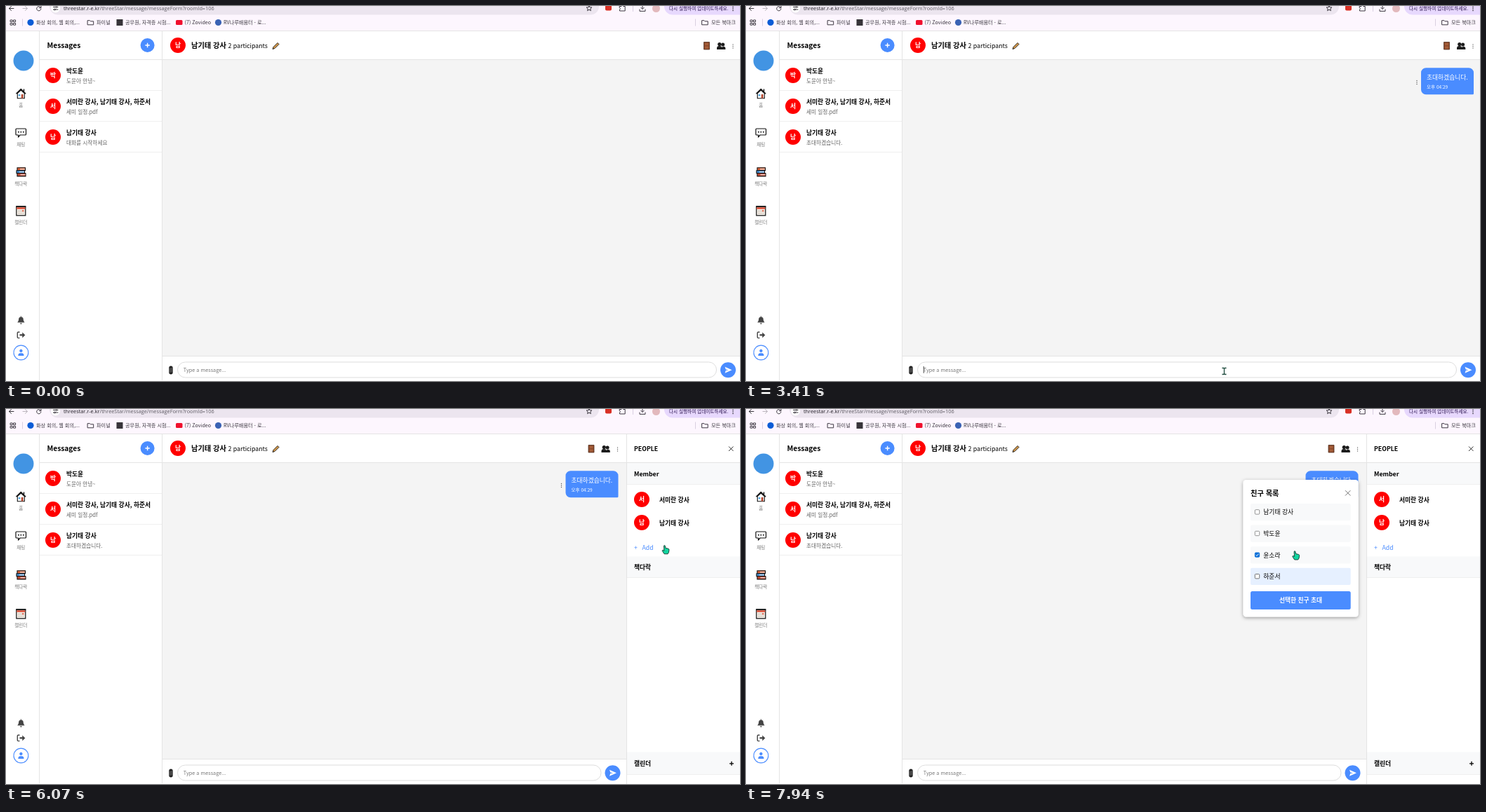
Animation, 1046 px wide and 535 px high, one loop 8000 ms. Source, as an HTML page:

```html
<!DOCTYPE html>
<html lang="ko">
<head>
<meta charset="utf-8">
<title>Messages</title>
<style>
html, body { margin: 0; width: 100%; height: 100%; overflow: hidden; background: #fff; }
svg { display: block; width: 1046px; height: 535px; }
text { font: 8.75px "Noto Sans CJK KR", "Noto Sans CJK", "Noto Sans KR", sans-serif; white-space: pre; fill: #000; }
.b { font-weight: 700; }
.h { font-size: 10.24px; font-weight: 700; }
.sub { font-size: 7.66px; fill: #666; }
.nav { font-size: 6.56px; fill: #777; text-anchor: middle; }
.in { font-size: 7.3px; }
.time { font-size: 6.56px; }
.bar { font-size: 7.15px; fill: #3c3840; }
.update { font-size: 6.6px; font-weight: 500; fill: #2d1650; }
.url { font: 7.34px "Open Sans", "Noto Sans", sans-serif; fill: #5c5861; }
.w { fill: #fff; }
.mid { text-anchor: middle; }
.blue { fill: #4a8cff; }
.grey { fill: #777; }
.line { fill: none; stroke: #3c3840; stroke-width: 1; stroke-linecap: round; stroke-linejoin: round; }
.rule { stroke: #e4e4e4; fill: none; }
.soft { stroke: #efefef; fill: none; }
.ink { fill: none; stroke: #111; stroke-linejoin: round; }
</style>
</head>
<body>
<svg viewBox="0 0 1046 535">
  <defs>
    <filter id="shadow" x="-10%" y="-10%" width="120%" height="120%">
      <feDropShadow dx="0" dy="1.5" stdDeviation="2.5" flood-opacity=".38"/>
    </filter>
    <path id="folder" class="line" d="M.5 1.2h3l1 1.1h4.2v5H.5z"/>
    <g id="dots"><circle r=".7" cy="-2.5"/><circle r=".7"/><circle r=".7" cy="2.5"/></g>
  </defs>

  <!-- browser bars -->
  <rect width="1046" height="35" fill="#fdf6fe"/>
  <rect x="62" y="-12" width="783" height="24.5" rx="12" fill="#ece5ef"/>
  <rect x="938" y="-12" width="120" height="24.5" rx="12" fill="#e7d8fd"/>
  <g class="line">
    <path d="M11 3.5H4.5M7.5 .5l-3 3 3 3"/>
    <path stroke="#bbb4bd" d="M24 3.5h6.500M27.5 .5l3 3-3 3"/>
    <path d="M49.7 2.6a3.1 3.1 0 1 0 .2 1.6M50 .3v2.4h-2.4"/>
  </g>
  <circle cx="70.5" cy="3" r="6.5" fill="#fff"/>
  <path class="line" d="M67.5 1.5h3M73 1.5h1M67.5 5h1M71 5h3"/>
  <circle class="line" cx="71.7" cy="1.5" r="1"/><circle class="line" cx="69.5" cy="5" r="1"/>
  <text class="url" x="82" y="6"><tspan fill="#1f1b24">threestar.r-e.kr</tspan>/threeStar/message/messageForm?roomId=106</text>
  <path class="line" d="M831 -.8l1.1 2.6 2.8.2-2.1 1.9.6 2.8-2.4-1.5-2.4 1.5.6-2.8-2.1-1.9 2.8-.2z"/>
  <rect x="854" y="-1" width="9" height="7.5" rx="2" fill="#d93025"/>
  <path class="line" d="M874.5 .5h2.5a1.4 1.4 0 0 1 2.8 0h2.4v6.5h-7.7v-2a1.4 1.4 0 0 0 0-2.6z"/>
  <path d="M893.5 0v8" stroke="#d9cfe0"/>
  <path class="line" d="M907 -1v5M904.7 2.2l2.3 2.3 2.3-2.3M903 5v2.4h8V5"/>
  <circle cx="926.5" cy="3.5" r="5.5" fill="#e3b9bd"/>
  <text class="bar update" x="945" y="6">다시 실행하여 업데이트하세요.</text>
  <use href="#dots" x="1036" y="4"/>

  <path class="line" d="M6.5 20h2.6v2.6H6.5zM11 20h2.6v2.6H11zM6.5 24.5h2.6v2.6H6.5zM11 24.5h2.6v2.6H11z"/>
  <path d="M23.5 18.5v10M982.5 18.5v10" stroke="#d9cfe0"/>
  <circle cx="35" cy="23.5" r="4.6" fill="#0b5cd6"/>
  <text class="bar" x="43" y="26">화상 회의, 웹 회의,...</text>
  <use href="#folder" x="116" y="19.5"/>
  <text class="bar" x="129" y="26">파이널</text>
  <rect x="157.5" y="19" width="9" height="9" fill="#38343a"/>
  <text class="bar" x="170" y="26">공무원, 자격증 시험...</text>
  <rect x="242" y="20" width="9.5" height="7" rx="1.5" fill="#f00f2d"/>
  <text class="bar" x="254.5" y="26">(7) Zovideo</text>
  <circle cx="302.5" cy="23.5" r="4.6" fill="#3a62b4"/>
  <text class="bar" x="310" y="26">RV나루배움터 - 로...</text>
  <use href="#folder" x="991.5" y="19.5"/>
  <text class="bar" x="1005" y="26">모든 북마크</text>

  <!-- page -->
  <rect x="223" y="77" width="823" height="422" fill="#f4f4f4"/>
  <path class="rule" d="M0 35.5h1046M47.5 36v498M222.5 36v498M48 76.5h998M223 499.5h823"/>
  <path class="soft" d="M48 120.5h174M48 164.5h174M48 208.5h174"/>

  <!-- side rail -->
  <circle cx="25" cy="78" r="14.5" fill="#4294e3"/>
  <path d="M16.3 124.5v7.2h10v-7.2l-5-4.500z" fill="#fff" stroke="#111" stroke-width="1.1"/>
  <path d="M14.5 125.3l6.8-6.8 6.8 6.8" class="ink" stroke-width="1.5"/>
  <path d="M25.5 118.500v3.500" class="ink" stroke-width="1.4"/>
  <path d="M17.800 126h2.500v2.500h-2.500z" fill="#4aa3e0"/><path d="M21.800 126h2.700v5.500h-2.700z" fill="#b5472f"/>
  <text class="nav" x="21.3" y="143.5">홈</text>
  <path class="ink" stroke-width="1.2" d="M15 175h12.5q1 0 1 1v7q0 1-1 1H20l-2.5 3v-3H15q-1 0-1-1v-7q0-1 1-1z"/>
  <path d="M17 179h1.7v1.5H17zM20.5 179h1.7v1.5h-1.7zM24 179h1.7v1.5H24z"/>
  <text class="nav" x="21.3" y="199.5">채팅</text>
  <g stroke="#111" stroke-width="1.1">
    <path d="M16 230.7h11.5v4H16z" fill="#d9633b"/><path d="M15 234.7h11.5v4H15z" fill="#458fd0"/><path d="M16 238.7h12v4.2H16z" fill="#c94c34"/>
    <path d="M20 232.7h7M19 236.7h7M20.5 240.8h7" stroke="#fff"/>
  </g>
  <text class="nav" x="21.3" y="255.5">책다락</text>
  <path d="M14.8 286h13v12.8h-13z" fill="#f3eee7" stroke="#111" stroke-width="1.2"/>
  <path d="M15.3 287.3h12v2.5h-12z" fill="#d94b35"/><path d="M14.3 286.1h14" class="ink" stroke-width="1.7"/>
  <path d="M17 292.5h8.5M17 295.5h8.5" stroke="#b8a99b" stroke-dasharray="1.5 .8"/><path d="M23 291.3h2.5v2H23z" fill="#e0614a"/>
  <text class="nav" x="21.3" y="311">캘린더</text>
  <path d="M16.3 451.5q1.8-1.8 1.8-4.5a3.3 3.3 0 0 1 6.6 0q0 2.7 1.8 4.5zM20 452.5h2.8a1.4 1.4 0 0 1-2.8 0zM20.8 442.6H22v2h-1.2z" fill="#444"/>
  <path d="M19.5 465.3h-2.2q-1 0-1 1v6.3q0 1 1 1h2.2" fill="none" stroke="#444" stroke-width="1.4"/>
  <path d="M19.5 468.2h3.8v-2.8l4 4-4 4v-2.8h-3.8z" fill="#444"/>
  <circle cx="21.4" cy="494.5" r="10.4" fill="#fff" stroke="#4a8cff" stroke-width="1.1"/>
  <path class="blue" d="M21.4 489.8a2.2 2.2 0 1 1-.01 0zM17.3 499q0-3.7 3-3.7h2.2q3 0 3 3.7z"/>

  <!-- conversation list -->
  <text class="h" x="58.5" y="60">Messages</text>
  <circle class="blue" cx="201.6" cy="56" r="10"/>
  <path d="M198.4 56h6.4M201.6 52.8v6.4" stroke="#fff" stroke-width="1.4"/>
  <g id="list"></g>
  <text class="sub" x="86" y="110">도윤아 안녕~</text>
  <text class="sub" x="86" y="154">세미 일정.pdf</text>
  <text class="sub" x="86" y="197.5" id="last"></text>

  <!-- chat -->
  <g id="head"></g>
  <text class="h" x="264" y="60.3">남기태 강사</text>
  <text x="316.5" y="59.7">2 participants</text>
  <path d="M380 61.5l1-3 6-6 2 2-6 6z" fill="#d79a4c" stroke="#111" stroke-width=".9" stroke-linejoin="round"/>
  <g id="right">
    <path d="M994.5 51.5h8v10.5h-8z" fill="#8c4a2c" stroke="#54301f" stroke-width=".8"/>
    <path d="M996.2 53h4.6v3h-4.6zM996.2 57.5h4.6v3.2h-4.6z" fill="#a55d38"/>
    <g fill="#1c1c1c">
      <circle cx="1016.8" cy="54.5" r="2.6"/><circle cx="1021.6" cy="55" r="2.5"/>
      <path d="M1013 62v-2q0-3 3.5-3t3.5 2q1-1.200 2.500-1.200 2.800 0 2.800 2.800v1.400z"/>
    </g>
    <use href="#dots" x="1036" y="57.5" fill="#666"/>
    <g id="bubble">
      <path class="blue" d="M969 88.3h61a7 7 0 0 1 7 7v29.5q0 1.5-1.5 1.5H969a7 7 0 0 1-7-7v-24a7 7 0 0 1 7-7z"/>
      <text class="w" x="970" y="105">초대하겠습니다.</text>
      <text class="w time" x="970" y="118">오후 04:29</text>
      <use href="#dots" x="956" y="109" fill="#555"/>
    </g>
    <circle class="blue" cx="1029" cy="519.2" r="11"/>
    <path class="w" d="M1024.5 514.700l10 4.500-10 4.500 1.300-3.700 4-.8-4-.8z"/>
  </g>
  <rect x="232.3" y="513.5" width="5.4" height="12" rx="2.7" fill="#222"/>
  <path d="M234 516.5v6.5M236 516v6.5" stroke="#8a8a8a" stroke-width=".7"/>
  <rect id="field" x="244.5" y="508" width="768" height="22" rx="11" fill="#fff" stroke="#ddd"/>
  <text class="in grey" x="252.8" y="521.8" id="hint">Type a message...</text>
  <text class="in" x="252.8" y="521.8" id="typed"></text>
  <rect id="mark" y="523" width="6.7" height=".7"/>
  <rect id="caret" y="514" width=".7" height="9.8"/>

  <!-- people panel -->
  <g id="panel">
    <rect x="884" y="36" width="162" height="499" fill="#fff"/>
    <path fill="#f8f9fa" d="M884 77h162v31H884zM884 210.5h162v30H884zM884 489.5h162v32H884z"/>
    <path class="rule" d="M884.5 36v499M884 76.5h162"/>
    <path class="soft" d="M885 107.5h161M885 240.5h161M885 521.5h161"/>
    <text class="b" x="895" y="59.7">PEOPLE</text>
    <path d="M1030 53.5l6.5 6.5M1036.5 53.5L1030 60" stroke="#222" stroke-width=".9"/>
    <text class="b" x="895" y="95.5">Member</text>
    <g id="members"></g>
    <text class="blue" x="895" y="201.3">+</text>
    <text class="blue" x="906.5" y="201.3">Add</text>
    <text class="b" x="895" y="229">책다락</text>
    <text class="b" x="895" y="509">캘린더</text>
    <path d="M1031 505.8h6M1034 502.8v6" stroke="#000" stroke-width="1.3"/>
  </g>

  <!-- friend picker -->
  <g id="picker">
    <rect x="708.5" y="101" width="164.3" height="195.5" rx="4.5" fill="#fff" filter="url(#shadow)"/>
    <text class="h" x="719" y="123.5">친구 목록</text>
    <path d="M854 116.2l7.4 7.4M861.4 116.2l-7.4 7.4" stroke="#666" stroke-width=".9"/>
    <g id="rows"></g>
    <rect class="blue" x="719" y="260" width="142.7" height="26" rx="2.5"/>
    <text class="b w mid" x="790.5" y="276.3">선택한 친구 초대</text>
  </g>

  <!-- pointer shapes, origin at the hot spot -->
  <g id="pointer" stroke-linejoin="round">
    <path id="beam" d="M-3-4.5h2.2l.8.7.8-.7H3M0-4v8M-3 4.5h2.2L0 3.8l.8.7H3" fill="none" stroke="#1d4a3c" stroke-width="1.3"/>
    <path id="arrow" d="M0 0v10.2l2.3-2 1.7 3.6 1.6-.8-1.7-3.4h3z" fill="#1fd6a4" stroke="#17332b" stroke-width=".9"/>
    <path id="hand" d="M-.9.8Q-.2-.5.9.8L1.5 4l4 1q1.4.5 1.1 2L6 10.5 4.7 12.5H-.3L-3.2 8q.2-1.6 1.7-.8l1 .8z" fill="#12d6a0" stroke="#17332b" stroke-width=".9"/>
  </g>
</svg>
<script>
const $ = id => document.getElementById(id);
const show = (id, on) => $(id).setAttribute('visibility', on ? 'inherit' : 'hidden');

const avatar = (x, y, c) =>
  `<circle cx="${x}" cy="${y}" r="11" fill="#f00"/><text class="b w mid" x="${x}" y="${y + 3.2}">${c}</text>`;
const label = (x, y, s) => `<text class="b" x="${x}" y="${y}">${s}</text>`;

const chats = ['박도윤', '서미란 강사, 남기태 강사, 하준서', '남기태 강사'];
$('list').innerHTML = chats.map((s, i) => avatar(67, 99 + 44 * i, s[0]) + label(86, 95.5 + 44 * i, s)).join('');
$('head').innerHTML = avatar(245, 56, '남');
$('members').innerHTML = ['서미란 강사', '남기태 강사']
  .map((s, i) => avatar(906, 129 + 33 * i, s[0]) + label(931, 132.5 + 33 * i, s)).join('');

const rowTop = i => 135 + 30.6 * i;
$('rows').innerHTML = ['남기태 강사', '박도윤', '윤소라', '하준서'].map((s, i) => {
  const y = rowTop(i);
  return `<rect class="row" x="719" y="${y}" width="142.7" height="24.2" rx="2"/>
    <rect class="box" x="725.3" y="${y + 8.7}" width="6.4" height="6.4" rx="1.2" stroke-width=".8"/>
    <text x="737.3" y="${y + 15.3}">${s}</text>`;
}).join('') + '<path id="tick" d="M726.7 208.3l1.3 1.3 2.5-3" fill="none" stroke="#fff"/>';
const rows = document.querySelectorAll('.row'), boxes = document.querySelectorAll('.box');

const ENTER = 460, FOCUS = 760, SEND = 3410, BLUR = 5400, OPEN = 5640, PICK = 6520, CHECK = 7380;
const keys = [
  [1220, 'ㅊ'], [1410, '초'], [1610, '촏'], [1700, '초대'], [1800, '초댛'], [1890, '초대하'],
  [1980, '초대학'], [2070, '초대하게'], [2350, '초대하겠'], [2480, '초대하겠ㅅ'], [2630, '초대하겠스'],
  [2810, '초대하겠습'], [2890, '초대하겠습ㄴ'], [2970, '초대하겠습니'], [3050, '초대하겠습닏'],
  [3130, '초대하겠습니다'], [3210, '초대하겠습니다.'], [SEND, '']
];
const path = [
  [460, 688, 531], [800, 681.5, 521], [3850, 681.5, 521], [4180, 880, 290], [4520, 1036, 47],
  [5030, 1034, 53], [5300, 1034.5, 55], [5680, 1034.5, 55], [5960, 955, 192], [6060, 938.5, 194.3],
  [6350, 910, 194], [6800, 907, 194], [7060, 808.3, 195.3], [7300, 785, 202], [7430, 785, 202],
  [7600, 786, 230], [7750, 793, 235.5], [7850, 792, 235], [7935, 782, 202.5]
];

function pointerAt(t) {
  const i = path.findIndex(p => p[0] > t);
  if (i < 0) return path[path.length - 1].slice(1);
  if (i === 0) return path[0].slice(1);
  const [t0, x0, y0] = path[i - 1], [t1, x1, y1] = path[i];
  let k = (t - t0) / (t1 - t0);
  k = k * k * (3 - 2 * k);
  return [x0 + (x1 - x0) * k, y0 + (y1 - y0) * k];
}

function rowAt(t) {
  const [x, y] = pointerAt(t);
  if (t < PICK || x < 719 || x > 861) return -1;
  return [0, 1, 2, 3].find(i => y >= rowTop(i) && y <= rowTop(i) + 24.2) ?? -1;
}

function shapeAt(t, x, y) {
  if (y > 508 && y < 530.5) return 'beam';
  const dots = t < OPEN + 60 && x > 1031 && y > 51.5 && y < 70;
  const add = t > OPEN && x > 890 && x < 960 && y > 188 && y < 206;
  return dots || add || rowAt(t) >= 0 ? 'hand' : 'arrow';
}

function drawInput(t) {
  let text = '', since = FOCUS;
  for (const [at, s] of keys) if (t >= at) { text = s; since = at; }
  $('typed').textContent = text;
  show('hint', !text);
  const end = 252.8 + (text ? $('typed').getComputedTextLength() : 0);
  $('caret').setAttribute('x', end);
  show('caret', t >= FOCUS && t < BLUR && (text || (t - since) % 1000 < 500));
  $('mark').setAttribute('x', end - 6.7);
  show('mark', text && !text.endsWith('.'));
}

function drawPicker(t) {
  const hover = rowAt(t - 80), checked = t >= CHECK;
  rows.forEach((r, i) => r.setAttribute('fill', i === hover ? '#e6f0ff' : '#f8f9fa'));
  boxes.forEach((b, i) => {
    const on = i === 2 && checked;
    b.setAttribute('fill', on ? '#0b6fd8' : '#fff');
    b.setAttribute('stroke', on ? '#0b6fd8' : i === hover ? '#4f4f4f' : '#767676');
  });
  show('tick', checked);
}

function draw(now) {
  const t = now % 8000, open = t >= OPEN;
  drawInput(t);
  $('last').textContent = t < SEND ? '대화를 시작하세요' : '초대하겠습니다.';
  show('bubble', t >= SEND);
  $('right').setAttribute('transform', `translate(${open ? -164.5 : 0})`);
  $('field').setAttribute('width', open ? 603.5 : 768);
  show('panel', open);
  show('picker', t >= PICK);
  drawPicker(t);

  const [x, y] = pointerAt(t), shape = shapeAt(t, x, y);
  $('pointer').setAttribute('transform', `translate(${x} ${y})`);
  for (const s of ['beam', 'arrow', 'hand']) show(s, t >= ENTER && s === shape);
}

const start = performance.now();
function loop() {
  draw(performance.now() - start);
  requestAnimationFrame(loop);
}
loop();
</script>
</body>
</html>
```
